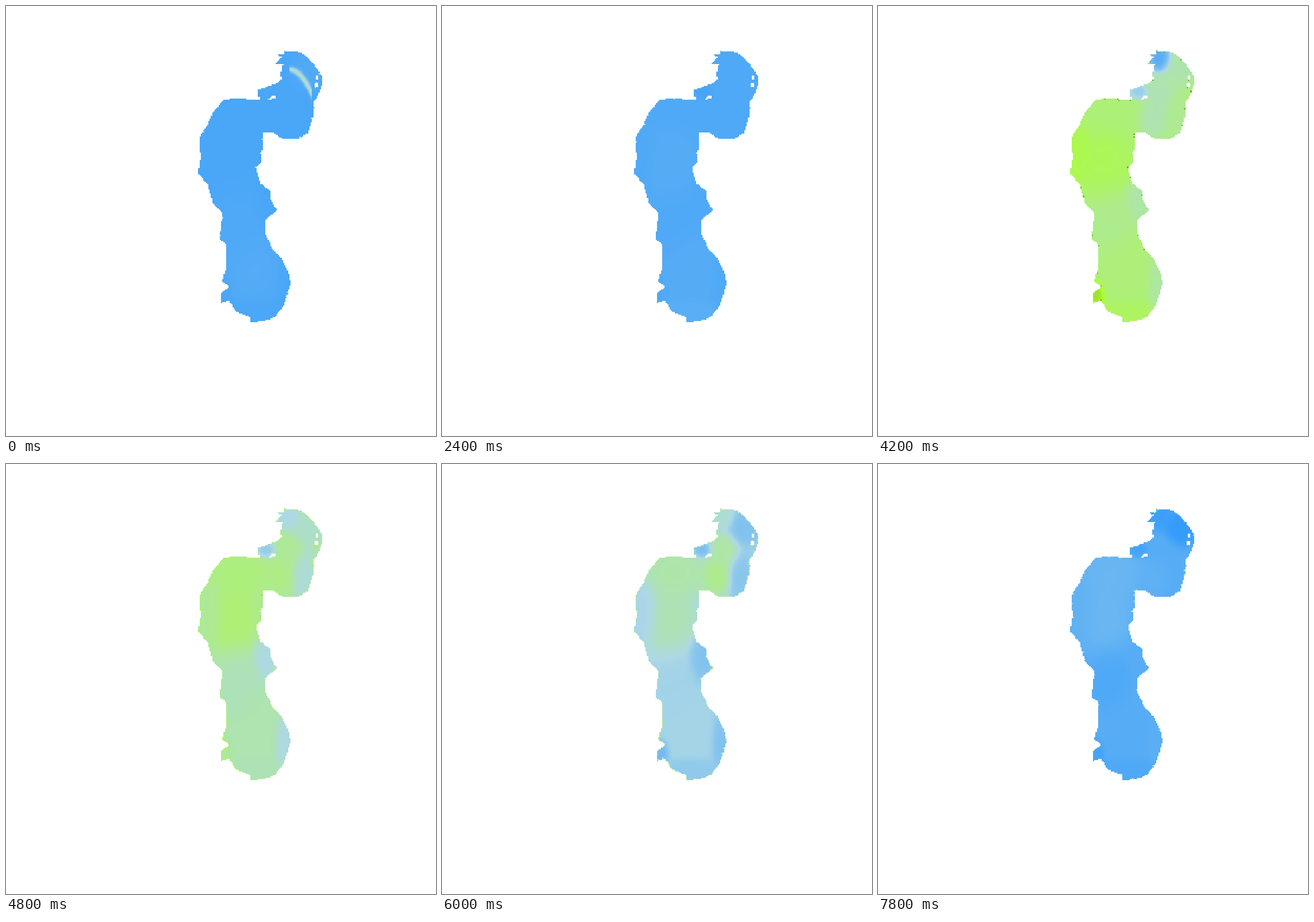
These frames come from a looping animation (748x748 px, 8000 ms). An HTML page with a canvas:

```html
<!DOCTYPE html>
<html lang="en">
<head>
<meta charset="utf-8">
<title>Lake colour map</title>
<style>
html, body { margin: 0; width: 100%; height: 100%; overflow: hidden; background: #fff; }
canvas { display: block; }
</style>
</head>
<body>
<canvas id="stage" width="748" height="748"></canvas>
<script>
const SIZE = 748, CELL = 2.2, GRID = 340, STEP = 600, LOOP = 8000;

// Key corners of the shoreline, clockwise; the cell grid gives it its ragged look.
const northEast = `M484 76 L487 79 504 79 519 84 531 97 541 108 550 124 550 135 542 158 534 166
  536 177 533 197 525 221 507 232 482 232 466 221 447 219 447 247 443 256 445 270 434 281`;
const south = ` 443 309 460 322 459 334 471 355 452 372 452 397 463 422 480 440 491 464 495 482
  490 500 482 523 468 540 458 546 437 548 437 551 426 551 424 541 399 531 388 512 373 517
  373 502 388 488 376 479 383 455 383 415 371 405 377 360`;
const northWest = ` 360 344 351 310 334 291 338 266 337 227 351 206 360 185 380 162 413 161
  438 164 444 160 438 157 438 146 470 135 481 126 477 121 481 101 467 100 480 90 472 85 484 83Z`;
const islands = "M538 122h6v5h-6z M537 135h7v6h-7z M457 163l6-6h6v3z";
const shore = new Path2D(northEast + south + northWest + islands);
const sandbank = new Path2D("M371 220l6-6v10l-3 6z");

// Parts of the lake: centre and reach.
const regions = {
  tip: [490, 92, 13, 16],
  head: [525, 112, 19, 20],
  cape: [453, 150, 12, 9],
  throat: [490, 152, 18, 22],
  mouth: [478, 195, 17, 22],
  pool: [518, 195, 14, 30],
  shoulder: [405, 190, 38, 30],
  westBay: [350, 255, 17, 36],
  upper: [398, 270, 27, 48],
  cove: [452, 338, 15, 27],
  waist: [405, 375, 26, 45],
  basin: [430, 460, 32, 45],
  eastBasin: [487, 482, 12, 34],
  southEnd: [430, 532, 36, 15],
  inlet: [381, 502, 9, 15],
};

// Colour level of each part (base where unnamed); rim is the share of shore cells at rimLevel.
const scenes = [
  { slot: 0, base: .31, basin: .38, waist: .35, head: .36, rim: .02, rimLevel: 1.2, streak: .85 },
  { slot: 2, base: .26, rim: .12, rimLevel: 1.2 },
  { slot: 4, base: .35, upper: .39, basin: .39, southEnd: .43, cape: .28, rim: .01, rimLevel: 1 },
  { slot: 7, base: 1.6, tip: .3, head: 1.28, cape: .75, throat: 1.25, mouth: 1.25, pool: 1.45,
    westBay: 1.85, upper: 1.78, cove: 1.32, waist: 1.48, eastBasin: 1.35, southEnd: 1.75,
    inlet: 2.25, rim: .05, rimLevel: 2.6 },
  { slot: 9, base: 1, tip: 1.65, head: 1, cape: .75, throat: 1.65, mouth: 1.85, pool: .7,
    shoulder: 1.6, westBay: 1.05, upper: 1.52, cove: .65, eastBasin: .6, southEnd: .75,
    inlet: .6, rim: .25, rimLevel: 1.8, sandbank: true },
  { slot: 12, base: .8, tip: .05, head: 0, cape: .3, throat: .88, mouth: .92, shoulder: .92,
    upper: .88, westBay: .78, cove: .72, waist: .76, basin: .83, inlet: .45,
    rim: .06, rimLevel: 1.5 },
  { slot: 13, base: .4, tip: .2, head: .14, cape: .25, mouth: .46, shoulder: .53, westBay: .48,
    upper: .54, waist: .34, eastBasin: .42, southEnd: .33, inlet: .25, rim: .07, rimLevel: 1.2 },
];

const RAMP = [[30, 144, 255], [173, 216, 230], [173, 255, 47], [70, 105, 40]];

function colorAt(level) {
  const v = Math.max(0, Math.min(RAMP.length - 1.001, level));
  const i = Math.floor(v);
  return RAMP[i].map((c, k) => c + (RAMP[i + 1][k] - c) * (v - i));
}

function seeded(seed) {
  return () => (seed = (seed * 16807) % 2147483647) / 2147483647;
}

function bell(x, y, [cx, cy, rx, ry]) {
  return Math.exp(-(((x - cx) / rx) ** 2) - ((y - cy) / ry) ** 2);
}

const ctx = document.getElementById("stage").getContext("2d");
const inLake = (x, y) => ctx.isPointInPath(shore, x, y, "evenodd");

const cells = [];
for (let row = 0; row < GRID; row++) {
  for (let col = 0; col < GRID; col++) {
    const x = (col + .5) * CELL, y = (row + .5) * CELL;
    if (!inLake(x, y)) continue;
    const edge = !(inLake(x - CELL, y) && inLake(x + CELL, y) &&
                   inLake(x, y - CELL) && inLake(x, y + CELL));
    cells.push({ x, y, edge, offset: (row * GRID + col) * 4, dry: ctx.isPointInPath(sandbank, x, y) });
  }
}

// Weighted mean of nearby parts, so neighbouring levels melt into each other.
function levelAt(scene, x, y) {
  let weight = .08, sum = weight * scene.base;
  for (const name in regions) {
    const w = bell(x, y, regions[name]);
    weight += w;
    sum += w * (scene[name] ?? scene.base);
  }
  return sum / weight;
}

// Thin arc of pale water in the head of the lake.
function streakAt(x, y) {
  const u = (x - 492) / 40;
  if (u < 0 || u > 1) return 0;
  return Math.exp(-(((y - 110 - 42 * u * u) / (4 + 5 * u)) ** 2));
}

for (const scene of scenes) {
  const random = seeded(scene.slot + 77);
  scene.levels = cells.map(({ x, y, edge }) => {
    if (edge && random() < scene.rim) return scene.rimLevel;
    return levelAt(scene, x, y) + (scene.streak ?? 0) * streakAt(x, y);
  });
}

function paint(slot) {
  const next = scenes.find(s => s.slot >= slot);
  const prev = scenes.filter(s => s.slot <= slot).pop();
  const mix = next === prev ? 0 : (slot - prev.slot) / (next.slot - prev.slot);
  const layer = document.createElement("canvas");
  layer.width = layer.height = GRID;
  const layerCtx = layer.getContext("2d");
  const image = layerCtx.createImageData(GRID, GRID);
  cells.forEach(({ offset, dry }, i) => {
    if (dry && prev.sandbank && mix === 0) return;
    const level = prev.levels[i] + (next.levels[i] - prev.levels[i]) * mix;
    image.data.set([...colorAt(level), 255], offset);
  });
  layerCtx.putImageData(image, 0, 0);
  return layer;
}

const layers = Array.from({ length: Math.ceil(LOOP / STEP) }, (_, slot) => paint(slot));
const start = performance.now();
let shown = -1;

function draw() {
  const slot = Math.floor(((performance.now() - start) % LOOP) / STEP);
  if (slot !== shown) {
    shown = slot;
    ctx.fillStyle = "#fff";
    ctx.fillRect(0, 0, SIZE, SIZE);
    ctx.imageSmoothingEnabled = false;
    ctx.drawImage(layers[slot], 0, 0, SIZE, SIZE);
  }
  requestAnimationFrame(draw);
}
draw();
</script>
</body>
</html>
```
